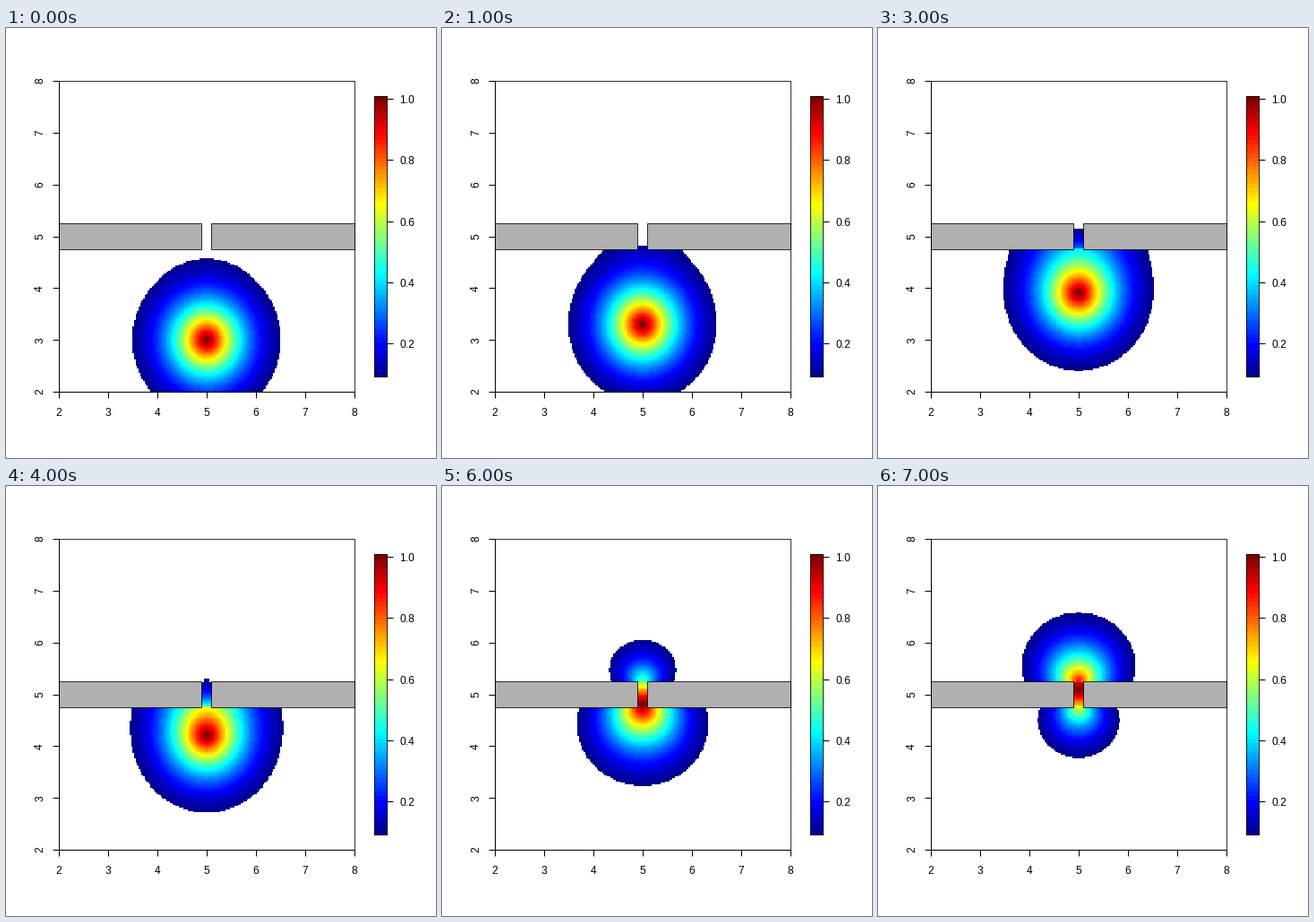
These frames come from a looping animation (480 px wide and 480 px high, 8 s). A matplotlib script:

```python
import numpy as np
import matplotlib.pyplot as plt
from matplotlib.animation import FuncAnimation
from matplotlib.colors import ListedColormap
from matplotlib.patches import Rectangle

FRAMES, INTERVAL = 8, 1000
LEFT, RIGHT, TOP, BOTTOM = 58.9, 388.9, 59, 406
WALL_LOW, WALL_HIGH, GAP = 4.75, 5.25, 0.1
FLOOR = 0.1
PX = 0.72  # points per pixel at 100 dpi

plt.rcParams["font.family"] = "Liberation Sans"

# Cell centres of the density grid
cells = 2.015 + 0.03 * np.arange(200)
X, Y = np.meshgrid(cells - 5, cells)
below, above = Y < WALL_LOW, Y > WALL_HIGH
channel = ~below & ~above & (np.abs(X) < GAP + 0.02)


def sx(x):
    return LEFT + (x - 2) / 6 * (RIGHT - LEFT)


def sy(y):
    return BOTTOM - (y - 2) / 6 * (BOTTOM - TOP)


def bar_y(v):
    return 79 + (1 - v) * 341.5


def jet_colors(n=64):
    t = np.arange(1, n + 1) / n
    return np.clip([1.5 - np.abs(4 * t - k) for k in (3, 2, 1)], 0, 1).T


def decay(d):
    return np.exp(-1.387 * np.maximum(d, 0) ** 1.25)


def lobe(mouth, start, slope, pinch):
    """Distance grown from a channel mouth, faster along the wall."""
    r = np.hypot(X, Y - mouth) + 1e-9
    c = np.abs(Y - mouth) / r
    return start + r * slope * (1 + pinch * (1 - c) ** 2)


def travel(d):
    return d * (0.86 + 0.7 * d)


def exit_lobe(mouth, d):
    return lobe(mouth, travel(d), 0.93 + 0.62 * d, 0.17 + 0.22 * d)


def density(src):
    if src < WALL_LOW:
        s = WALL_LOW - src
        mirror = np.hypot(X, Y - src - 2 * s)
        room = decay(np.hypot(X, Y - src)) + 0.3 * min(1, 2 * s) * decay(mirror)
        rate = 1.7 - 1.25 * (s - 0.65) ** 2
        inner = s + rate * (Y - WALL_LOW)
        far = lobe(WALL_HIGH, s + rate * (WALL_HIGH - WALL_LOW), 1.3, 0.28)
    else:
        room = decay(exit_lobe(WALL_LOW, src - WALL_LOW))
        inner = travel(np.hypot(0.5 * X, Y - src))
        far = exit_lobe(WALL_HIGH, WALL_HIGH - src)
    v = np.select([below, channel, above], [room, decay(inner), decay(far)])
    return np.ma.masked_less(v / v.max(), FLOOR)


fig = plt.figure(figsize=(4.8, 4.8), dpi=100, facecolor="white")
ax = fig.add_axes([0, 0, 1, 1])
cmap = ListedColormap(jet_colors())
image = ax.imshow(density(3.0), cmap=cmap, vmin=FLOOR, vmax=1, origin="lower",
                  extent=(LEFT + 0.5, RIGHT + 0.5, BOTTOM + 0.5, TOP + 0.5),
                  interpolation="nearest", aspect="auto")


def line(xs, ys):
    ax.plot(xs, ys, color="black", lw=PX, solid_capstyle="butt", zorder=4)


def label(x, y, text, **kw):
    ax.text(x, y, text, fontsize=12 * PX, va="center_baseline", **kw)


def box(x0, y0, x1, y1, face, width=0.8):
    ax.add_patch(Rectangle((x0, y0), x1 - x0, y1 - y0, facecolor=face,
                           edgecolor="black", lw=width * PX, zorder=3))


# Barrier with a narrow gap
for a, b in ((2, 5 - GAP), (5 + GAP, 8)):
    box(sx(a), sy(WALL_HIGH), sx(b), sy(WALL_LOW), "#b0b0b0")

# Frame and axes
box(LEFT, TOP, RIGHT, BOTTOM, "none")
line((LEFT, RIGHT), (BOTTOM, BOTTOM))
line((LEFT, LEFT), (TOP, BOTTOM))
for k in range(2, 9):
    line((sx(k), sx(k)), (BOTTOM, BOTTOM + 7))
    line((LEFT - 7, LEFT), (sy(k), sy(k)))
    label(sx(k), 428.4, str(k), ha="center")
    ax.text(38, sy(k), str(k), fontsize=12 * PX, rotation=90,
            ha="center", va="center")

# Colour scale
ax.imshow(np.arange(64)[:, None], cmap=cmap, origin="lower", aspect="auto",
          extent=(411, 426, 390, 76), interpolation="nearest")
box(411, 76, 425, 389, "none")
for v in (0.2, 0.4, 0.6, 0.8, 1.0):
    line((425, 432), (bar_y(v), bar_y(v)))
    label(439, bar_y(v) + 0.5, f"{v:.1f}", ha="left")

ax.set_xlim(0, 480)
ax.set_ylim(480, 0)
ax.axis("off")


def update(i):
    image.set_data(density(3 + 0.3 * i))
    return (image,)


anim = FuncAnimation(fig, update, frames=FRAMES, interval=INTERVAL,
                     repeat=True, repeat_delay=0)
plt.show()
```
